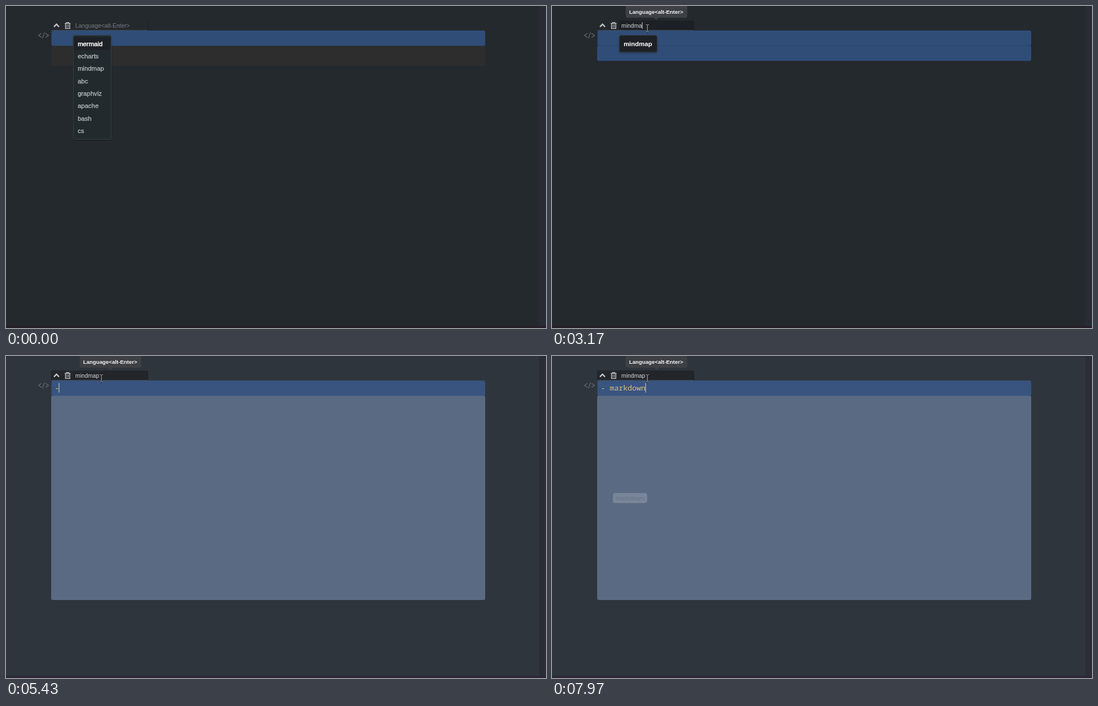
An HTML page for the animation above (8000 ms loop, 968x578 px).

```html
<!DOCTYPE html>
<html lang="en">
<head>
<meta charset="utf-8">
<title>Mind map code block</title>
<style>
  html, body { margin: 0; width: 100%; height: 100%; overflow: hidden; background: #24292d; }
  svg { display: block; width: 968px; height: 578px; }
  text { font-family: "Liberation Sans", Arial, sans-serif; white-space: pre; }
  .mono { font-family: "Noto Sans Mono", "DejaVu Sans Mono", monospace; font-size: 13.33px; }
</style>
</head>
<body>
<svg viewBox="0 0 968 578">
  <defs>
    <filter id="shadow" x="-10%" y="-10%" width="120%" height="125%">
      <feDropShadow dx="0" dy="1" stdDeviation="1" flood-color="#000" flood-opacity=".45"/>
    </filter>
  </defs>

  <rect id="page" width="968" height="578"/>
  <rect id="topLine" width="956" height="1"/>
  <rect id="side" x="956" width="12" height="578"/>
  <rect id="foot" y="574.5" width="968" height="3.5"/>

  <g fill="none" stroke="#63686c" stroke-width="1.3">
    <path d="M63.5 49 58.3 52.7 63.5 56.4M71 49 76.2 52.7 71 56.4M69.2 47.4 65.3 58.2"/>
  </g>

  <rect id="preview" x="81" y="71" width="778" rx="3"/>
  <rect id="code" x="81.5" y="44" width="777.5" height="27.4" rx="3"/>
  <path id="seam" d="M82 71.3H858" stroke="#29436b" stroke-width=".8"/>

  <rect id="node" y="246" height="18" rx="4" fill="#fff"/>
  <text id="nodeText" y="258.5" font-size="11" fill="#39424e"></text>
  <rect id="dash" x="162" y="254" width="8.5" height="1" fill="#8b95a5"/>

  <g id="toolbar">
    <rect id="bar" x="81" y="26" width="173" height="18"/>
    <rect id="field" x="120" y="26" width="134" height="17.5" fill="#1d2125"/>
    <path d="M81.5 26.5V43M254.5 27V44" stroke="#1c2023" opacity=".8"/>
    <path d="M81 43.6H254" stroke="#4a4e53" stroke-width=".8"/>
    <path d="M86 37.4 90.5 32.7 95 37.4" fill="none" stroke="#c6c8ca" stroke-width="2.3"/>
    <g fill="none" stroke="#c6c8ca">
      <path d="M105.3 31.3H115.7M108.3 31V29.6H112.7V31" stroke-width="1.2"/>
      <path d="M106.6 32V40.3H114.4V32" stroke-width="1.3"/>
      <path d="M109.1 33V38.7M111.9 33V38.7" stroke-width="1"/>
    </g>
    <text id="fieldText" x="124.3" y="38.5" font-size="10.4"></text>
  </g>
  <rect id="fieldCaret" y="29" width="1" height="12" fill="#d5d7d9"/>

  <text id="codeText" class="mono" x="87.5" y="62" fill="#dcc184"></text>
  <rect id="codeCaret" y="48.5" width="1.1" height="17" fill="#d8cda8"/>

  <g id="menu">
    <rect id="menuBox" x="120.5" y="52.5" width="68" rx="3" stroke="#42474b" stroke-width=".8" filter="url(#shadow)"/>
    <rect id="menuTop" x="121" y="56" width="67" height="23" fill="#1d2125"/>
    <g id="menuItems" font-size="11.5"></g>
  </g>

  <g id="tip">
    <path d="M132 0H242.5V18Q242.5 21 239.5 21H191L187 25 183 21H135Q132 21 132 18Z" fill="#3d4044"/>
    <text x="138.2" y="14" font-size="9.75" font-weight="bold" fill="#f2f3f4">Language&lt;alt-Enter&gt;</text>
  </g>

  <g id="mouse" fill="none">
    <path d="M-2.5-6.5H2.5M0-6.5V6.5M-2.5 6.5H2.5" stroke="#0c0e10" stroke-width="2.6"/>
    <path d="M-2.5-6.5H-.6M.6-6.5H2.5M0-6V6M-2.5 6.5H-.6M.6 6.5H2.5" stroke="#d4d6d8" stroke-width="1"/>
  </g>
</svg>

<script>
const LOOP = 8000, ROW = 22.35;
const $ = id => document.getElementById(id);
const set = (id, attrs) => { for (const k in attrs) $(id).setAttribute(k, attrs[k]); };
const show = (id, on) => set(id, { visibility: on ? 'visible' : 'hidden' });
const within = (t, a, b) => t >= a && t < b;
const clamp = v => Math.max(0, Math.min(1, v));
const typed = (word, times, t) => word.slice(0, times.filter(k => t >= k).length);

const fieldKeys = [1990, 2150, 2300, 2450, 2850, 3000, 3240];
const codeKeys = [5430, 5730, 5950, 6220, 6520, 6660, 6970, 7300, 7580, 7820];
const allItems = ['mermaid', 'echarts', 'mindmap', 'abc', 'graphviz', 'apache', 'bash', 'cs'];
const mItems = ['mermaid', 'mindmap', 'makefile', 'matlab', 'armasm', 'xml', 'yaml'];

// time, x, y of the pointer
const path = [[300, 846, 317], [530, 520, 175], [760, 190, 72], [840, 76, 52],
  [920, 118, 44], [1070, 172, 38], [1150, 170, 42], [1300, 171, 40]];
const ruler = document.createElement('canvas').getContext('2d');
const textWidth = (s, size) => {
  ruler.font = `${size}px "Liberation Sans", Arial, sans-serif`;
  return ruler.measureText(s).width;
};

function pointer(t) {
  let i = path.length - 1;
  while (i > 0 && path[i][0] > t) i--;
  const a = path[i], b = path[i + 1] || a;
  const p = t < 1070 && b !== a ? (t - a[0]) / (b[0] - a[0]) : 0;
  return [1, 2].map(k => a[k] + (b[k] - a[k]) * p);
}

let menuKey = '';
function drawMenu(t) {
  show('menu', t < 3320);
  const items = t < 1990 ? allItems : t < 2300 ? mItems : ['mindmap'];
  const key = items.join();
  if (key === menuKey) return;
  menuKey = key;
  const single = items.length === 1;
  set('menuBox', { height: 30.5 + (items.length - 1) * ROW, fill: single ? '#1d2125' : '#24292d' });
  $('menuItems').replaceChildren(...items.map((word, i) => {
    const el = document.createElementNS('http://www.w3.org/2000/svg', 'text');
    const color = i ? '#b9bcbe' : '#fff';
    const look = { x: 128.4, y: 71.6 + i * ROW, fill: color };
    Object.assign(look, single ? { 'font-weight': 'bold' } : { stroke: color, 'stroke-width': i ? .3 : .5 });
    for (const k in look) el.setAttribute(k, look[k]);
    el.textContent = word;
    return el;
  }));
}

function drawBlocks(t) {
  const light = t >= 4720, map = t >= 3240, plain = t < 2070;
  set('page', { fill: light ? '#2f353d' : '#24292d' });
  set('topLine', { fill: light ? '#282d34' : '#1f2428' });
  set('side', { fill: light ? '#2b2d36' : '#292c34' });
  set('foot', { fill: light ? '#2c2638' : '#271d29' });
  set('code', { fill: light ? '#38547f' : '#304d78' });
  set('preview', {
    height: map ? 367 : plain ? 36.5 : 27.5,
    fill: light ? '#5a6a82' : map ? '#55637c' : plain ? '#2d2d2d' : '#304d78'
  });
  show('seam', !plain && !map);
  set('bar', { fill: light ? '#24282d' : '#24292d' });
  set('field', { opacity: light ? .25 : 1 });
  show('field', t >= 920);
}

function drawField(t) {
  const word = typed('mindmap', fieldKeys, t);
  $('fieldText').textContent = word || 'Language<alt-Enter>';
  set('fieldText', { fill: word ? '#d3d5d7' : '#777b7f' });
  set('fieldCaret', { x: word ? 124.3 + textWidth(word, 10.4) : 124 });
  show('fieldCaret', within(t, 1070, 1610) || within(t, 1990, 3780) || within(t, 4250, 4420));
}

function drawCode(t) {
  const line = typed('- markdown', codeKeys, t), word = line.slice(2);
  $('codeText').textContent = line;
  set('codeCaret', { x: 87.2 + line.length * 8 - (line.length === 1 ? .7 : 0) });
  show('codeCaret', within(t, 4420, 4950) || t >= 5430);

  const w = textWidth(word, 11), rise = clamp((t - 6660) / 1310);
  set('node', { x: 159.9 - w, width: w + 10.6, opacity: .09 + .1 * rise });
  set('nodeText', { x: 165.2 - w, opacity: .28 * rise });
  $('nodeText').textContent = word;
  show('node', word);
  show('nodeText', word);
  set('dash', { opacity: .3 + .15 * clamp((t - 3240) / 540) });
  show('dash', within(t, 3240, 5430) || within(t, 5580, 5950));
}

function draw(t) {
  drawBlocks(t);
  drawField(t);
  drawMenu(t);
  drawCode(t);
  set('tip', { opacity: clamp((t - 920) / 150) });
  show('mouse', t >= 300);
  set('mouse', { transform: `translate(${pointer(t).join()})` });
}

const start = performance.now();
function tick() {
  draw((performance.now() - start) % LOOP);
  requestAnimationFrame(tick);
}
draw(0);
requestAnimationFrame(tick);
</script>
</body>
</html>
```
